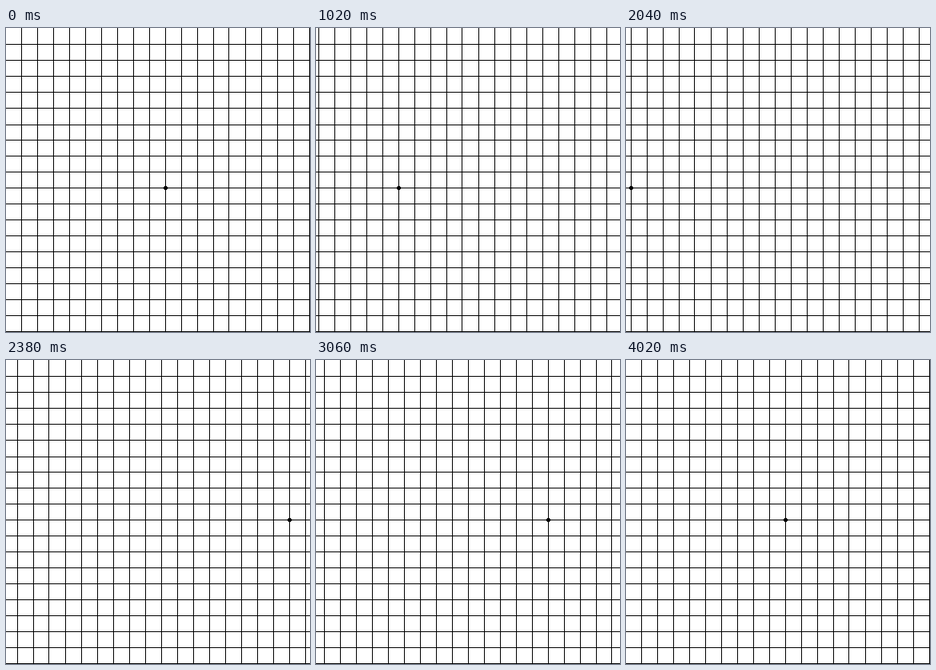
Animation, 380 px wide and 381 px high, one loop 4040 ms. Source, as an HTML page:

```html
<!DOCTYPE html>
<html lang="en">
<head>
<meta charset="utf-8">
<title>Drifting grid</title>
<style>
  html, body { margin: 0; width: 100%; height: 100%; overflow: hidden; background: #fff; }
  svg { display: block; }
</style>
</head>
<body>
<svg width="380" height="381" viewBox="0 0 380 381" shape-rendering="crispEdges">
  <defs>
    <g id="tile">
      <path id="columns"/>
      <path d="M198 198h3v5h-3zM197 199h5v3h-5z"/>
    </g>
  </defs>
  <path id="rows"/>
  <g id="drift">
    <use href="#tile" x="-380"/>
    <use href="#tile"/>
    <use href="#tile" x="380"/>
  </g>
</svg>
<script>
const WIDTH = 380, HEIGHT = 381, CELL = 20, LINES = 19;
const FRAME_MS = 20, LOOP_MS = 4040;
const STEPS = LOOP_MS / FRAME_MS - 1;
const DOT_X = 199;

const byId = id => document.getElementById(id);
const lines = draw => Array.from({ length: LINES }, (_, i) => draw(i)).join("");

// One row and one column sit a pixel off the regular spacing.
byId("rows").setAttribute("d", lines(i =>
  `M0 ${(i + 1) * CELL + (i === 5 ? 1 : 0)}h${WIDTH}v1h-${WIDTH}z`));
byId("columns").setAttribute("d", lines(i =>
  `M${(i + 1) * CELL - 1 - (i === 13 ? 1 : 0)} 0h1v${HEIGHT}h-1z`));

const drift = byId("drift");

function render(ms) {
  const step = Math.floor((ms % LOOP_MS) / FRAME_MS);
  const x = Math.round(DOT_X - WIDTH * step / STEPS);
  const wrapped = (x + WIDTH) % WIDTH;
  drift.setAttribute("transform", `translate(${wrapped - DOT_X} 0)`);
}

const start = performance.now();
function tick() {
  render(performance.now() - start);
  requestAnimationFrame(tick);
}
tick();
</script>
</body>
</html>
```
